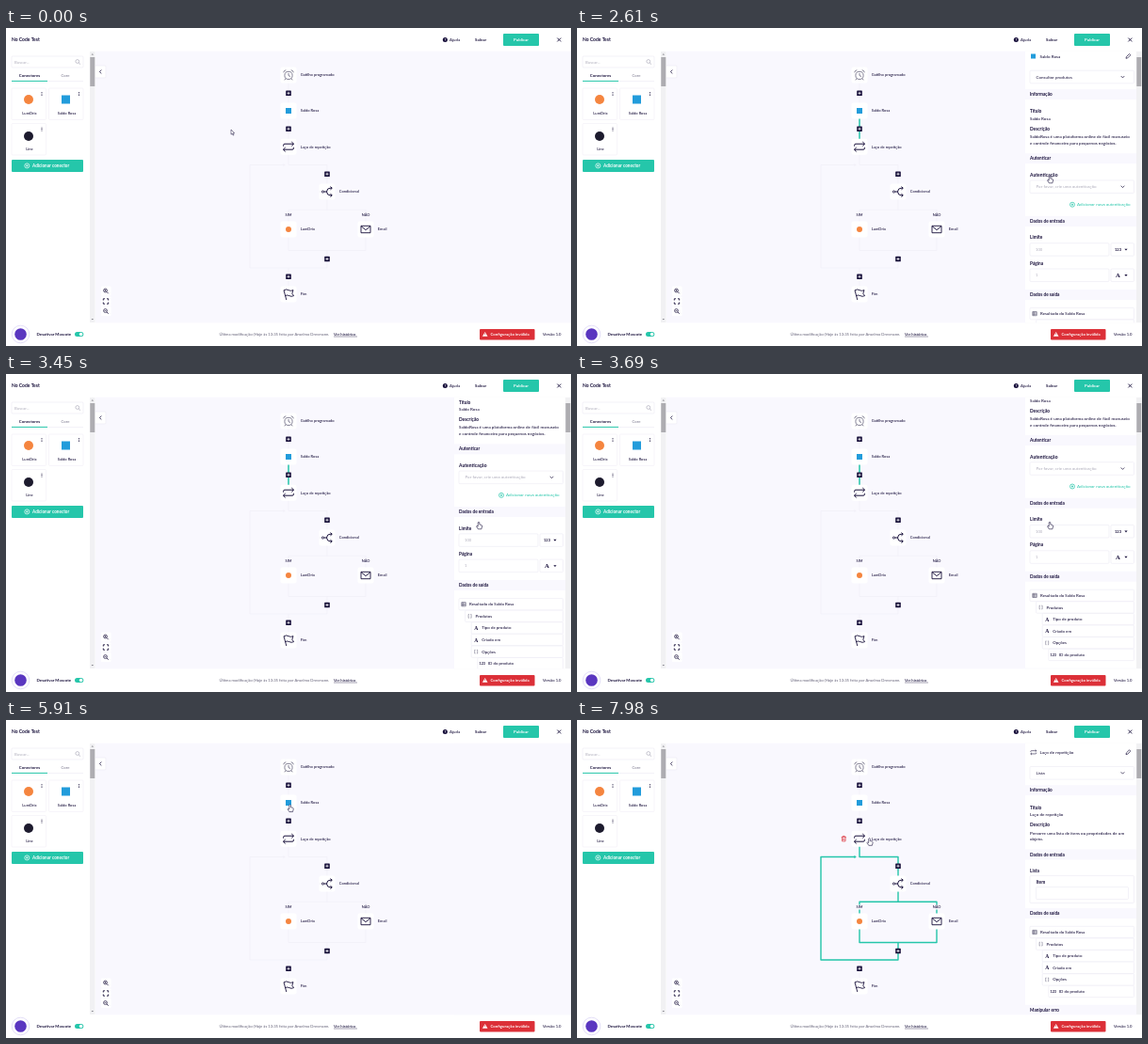
Write an HTML page with a canvas that moves like this. It is 600 px wide and 338 px high and loops after 8 s.

```html
<!DOCTYPE html>
<html lang="pt-BR">
<head>
<meta charset="utf-8">
<title>No Code Test</title>
<style>
html, body { margin: 0; width: 100%; height: 100%; overflow: hidden; background: #fff; }
canvas { display: block; width: 100vw; height: 100vh; }
</style>
</head>
<body>
<canvas id="stage"></canvas>
<script>
const W = 600, H = 338, LOOP = 8000;
const INK = '#170f3a', TEAL = '#25c6aa', RED = '#dc3038', BLUE = '#229cdb', ORANGE = '#f5853f';
const SOFT = '#f9f8fe', EDGE = '#ebe9f3', GREY = '#aeacbb', WHITE = '#fff';
const BRAND = 'Saldo Rosa';

const stage = document.getElementById('stage');
const ratio = Math.max(1, window.devicePixelRatio || 1);
stage.width = W * ratio;
stage.height = H * ratio;
const c = stage.getContext('2d');

// ---- drawing helpers ----
function text(str, x, y, size = 4.55, weight = 500, color = INK, align = 'left') {
  c.save();
  c.translate(x, y + size * 0.35);
  c.scale(0.1, 0.1);
  c.font = `${weight} ${size * 10}px Lato, "Open Sans", sans-serif`;
  c.textAlign = align;
  c.fillStyle = color;
  c.fillText(str, 0, 0);
  c.restore();
}
const bold = (str, x, y, size = 4.8, color = INK, align) => text(str, x, y, size, 700, color, align);

function rect(x, y, w, h, color) {
  c.fillStyle = color;
  c.fillRect(x, y, w, h);
}
function box(x, y, w, h, fill = WHITE, stroke = EDGE, r = 1) {
  c.beginPath();
  c.roundRect(x, y, w, h, r);
  if (fill) { c.fillStyle = fill; c.fill(); }
  if (stroke) { c.strokeStyle = stroke; c.lineWidth = 0.6; c.stroke(); }
}
function dot(x, y, r, color) {
  c.beginPath();
  c.arc(x, y, r, 0, 7);
  c.fillStyle = color;
  c.fill();
}
function ring(x, y, r, color = INK, width = 0.7) {
  c.beginPath();
  c.arc(x, y, r, 0, 7);
  c.strokeStyle = color;
  c.lineWidth = width;
  c.stroke();
}
function line(color, width, ...pts) {
  c.beginPath();
  for (let i = 0; i < pts.length; i += 2) c.lineTo(pts[i], pts[i + 1]);
  c.strokeStyle = color;
  c.lineWidth = width;
  c.stroke();
}
function path(d, x, y, stroke = INK, width = 0.9, fill) {
  c.save();
  c.translate(x, y);
  const p = new Path2D(d);
  if (fill) { c.fillStyle = fill; c.fill(p); }
  if (stroke) { c.strokeStyle = stroke; c.lineWidth = width; c.stroke(p); }
  c.restore();
}

// ---- icons, each centred on x, y ----
const chevron = (x, y) => path('M-1.8 -1L0 0.9L1.8 -1', x, y, INK, 0.7);
const caret = (x, y) => path('M-1.6 -0.8H1.6L0 1.1Z', x, y, null, 0, INK);
const repeatIcon = (x, y, k = 1) => {
  c.save();
  c.translate(x, y);
  c.scale(k, k);
  path('M-5.5 -0.6V-1.5Q-5.5 -3 -4 -3H5.4M3.3 -5.2L5.6 -3L3.3 -0.8M5.5 0.6V1.5Q5.5 3 4 3H-5.4M-3.3 0.8L-5.6 3L-3.3 5.2', 0, 0, INK, 1);
  c.restore();
};
function clockIcon(x, y) {
  const grey = '#77748b';
  ring(x, y + 0.4, 4.1, grey, 0.9);
  path('M0 -2V0.6L2 1.5M-5.3 -2.7Q-5 -5 -2.7 -5.2M5.3 -2.7Q5 -5 2.7 -5.2M-3 3.6L-4.2 5.3M3 3.6L4.2 5.3', x, y, grey, 0.9);
}
function branchIcon(x, y) {
  path('M-3.4 0H-0.5M5 -3.8H3Q0 -3.8 -0.5 0Q0 3.8 3 3.8H5M3.5 -5.4L5.3 -3.8L3.5 -2.2M3.5 2.2L5.3 3.8L3.5 5.4', x, y, INK, 1);
  ring(x - 4.5, y, 1.1, INK, 0.8);
}
const mailIcon = (x, y) => path('M-5 -3.7H5V3.7H-5ZM-5 -3.4L0 0.7L5 -3.4', x, y, INK, 0.9);
const flagIcon = (x, y) => path('M-2.2 6L-5 -4.2Q-2 -6 0.2 -4.3Q2.5 -3 5 -4.4L3.8 -0.8L5.6 1.6Q3 3 0.8 1.6Q-1.3 0.4 -3.5 1.6', x, y, INK, 0.9);
const trashIcon = (x, y) => path('M-2.5 -1.8H2.5M-1 -1.8V-2.8H1V-1.8M-1.9 -1.8L-1.7 2.7H1.7L1.9 -1.8M-0.6 -0.5V1.6M0.6 -0.5V1.6', x, y, RED, 0.7);
const pencilIcon = (x, y) => path('M-2.3 2.3L-1.9 0.6L1.2 -2.5L2.5 -1.2L-0.6 1.9Z', x, y, INK, 0.7);
function lens(x, y, sign, color = INK) {
  ring(x - 0.5, y - 0.5, 1.9, color, 0.7);
  line(color, 0.8, x + 0.9, y + 0.9, x + 2.7, y + 2.7);
  if (sign) line(color, 0.6, x - 1.4, y - 0.5, x + 0.4, y - 0.5);
  if (sign === '+') line(color, 0.6, x - 0.5, y - 1.4, x - 0.5, y + 0.4);
}
function plusBox(x, y) {
  box(x - 2.8, y - 2.8, 5.6, 5.6, INK, null, 0.6);
  path('M-1.5 0H1.5M0 -1.5V1.5', x, y, WHITE, 0.8);
}
function plusRing(x, y, color) {
  ring(x, y, 2.5, color, 0.7);
  path('M-1.2 0H1.2M0 -1.2V1.2', x, y, color, 0.7);
}
const square = (x, y, s, color) => rect(x - s / 2, y - s / 2, s, s, color);

// ---- fixed frame of the page ----
function drawHeader() {
  rect(0, 0, W, 24.5, WHITE);
  bold('No Code Test', 6, 12.5, 5);
  dot(466.3, 12.5, 2.5, INK);
  bold('?', 466.3, 12.5, 4, WHITE, 'center');
  text('Ajuda', 471, 12.5, 4.4);
  bold('Salvar', 498, 12.5, 4.5);
  box(528, 6, 38, 13, TEAL, null);
  bold('Publicar', 547, 12.5, 4.4, WHITE, 'center');
  path('M-1.9 -1.9L1.9 1.9M1.9 -1.9L-1.9 1.9', 587.3, 12.5, INK, 0.9);
}

function card(x, y, label) {
  box(x, y, 36.5, 33.5, WHITE, '#f1eff7');
  for (const d of [-1.6, 0, 1.6]) dot(x + 32, y + 6 + d, 0.5, INK);
  text(label, x + 19, y + 27, 4.1, 500, INK, 'center');
}
function scrollbar(x) {
  rect(x, 25, 5.5, 288, '#f1f1f3');
  rect(x + 0.3, 31, 5, 31, '#adacb1');
}
function drawSidebar() {
  rect(0, 24.5, 95, 289, WHITE);
  box(6, 30, 76, 12);
  text('Buscar...', 9, 36.3, 4.3, 400, GREY);
  lens(76.3, 36, '', GREY);
  bold('Conectores', 25, 50.3, 4.4, INK, 'center');
  text('Core', 63, 50.3, 4.3, 400, '#77748b', 'center');
  line(EDGE, 0.6, 6, 56.5, 82, 56.5);
  line(TEAL, 1, 6, 56.4, 44, 56.4);
  card(6, 64, 'LumDrix');
  dot(24, 76, 5, ORANGE);
  card(45.5, 64, BRAND);
  square(63.5, 76, 9, BLUE);
  card(6, 101.5, 'Line');
  dot(24, 115, 5, '#1d1b2e');
  box(6, 140, 76, 13, TEAL, null);
  plusRing(22.3, 146.4, WHITE);
  bold('Adicionar conector', 28, 146.5, 4.65, WHITE);
  scrollbar(89);
  path('M-1.2 0.6L0 -0.7L1.2 0.6Z', 91.8, 28, null, 0, '#77777f');
  path('M-1.2 -0.6L0 0.7L1.2 -0.6Z', 91.8, 309.5, null, 0, '#77777f');
}

function drawFooter() {
  rect(0, 313.5, W, 24.5, WHITE);
  ring(15.5, 325.5, 9.3, '#dcd6f5', 0.8);
  dot(15.5, 325.5, 6.3, '#5a36c0');
  bold('Desativar Mascote', 32.5, 325.3, 4.4);
  box(73, 323, 9.3, 5, TEAL, null, 2.5);
  dot(79.6, 325.5, 1.8, WHITE);
  text('Última modificação (Hoje às 13:35 feita por Anselmo Drevmann.', 226.5, 325.3, 4.15, 400, '#605d74');
  text('Ver histórico', 348, 325.3, 4.2);
  line(INK, 0.4, 348, 328, 373, 328);
  box(503, 320, 58.5, 11.5, RED, null);
  path('M0 -2.5L2.8 2.3H-2.8Z', 508.7, 325.4, null, 0, WHITE);
  line(RED, 0.6, 508.7, 324.2, 508.7, 326.2);
  bold('Configuração inválida', 514.5, 325.4, 4.3, WHITE);
  text('Versão 1.0', 570, 325.3, 4.2);
}

// ---- flow diagram ----
function node(x, y, label, icon) {
  box(x - 8.5, y - 8.5, 17, 17, WHITE, null, 2);
  icon(x, y);
  text(label, x + 12.7, y, 4.1);
}
function loopLines(color, w) {
  line(color, w, 300, 134, 300, 145.5, 341, 145.5, 341, 166);
  line(color, w, 341, 182, 341, 193.2);
  line(color, w, 300, 206, 300, 193.2, 382, 193.2, 382, 206);
  line(color, w, 300, 222, 300, 236.5, 382, 236.5, 382, 222);
  line(color, w, 341, 236.5, 341, 255, 259, 255, 259, 145.5, 296, 145.5);
  path('M-1.6 -1.6L0.8 0L-1.6 1.6Z', 296, 145.5, null, 0, color);
}
function drawFlow(s) {
  rect(95, 24.5, 505, 289, SOFT);
  box(94.5, 40, 11.5, 13, WHITE, EDGE);
  path('M1 -1.9L-0.9 0L1 1.9', 100.3, 46.5, INK, 0.8);

  const pale = '#f1eff8';
  line(pale, 0.7, 300, 58, 300, 80);
  line(pale, 0.7, 300, 96, 300, 118);
  line(pale, 0.7, 300, 255, 300, 275);
  loopLines(pale, 0.7);
  if (s.linkOn) line(TEAL, 1.5, 300, 96, 300, 118);
  if (s.loopOn) loopLines(TEAL, 1.4);

  for (const [x, y] of [[300, 69.3], [300, 107.2], [341, 155.2], [341, 245.5], [300, 264.3]]) plusBox(x, y);
  for (const [label, x] of [['SIM', 300], ['NÃO', 382]]) {
    rect(x - 5, 196.5, 10, 5, SOFT);
    text(label, x, 199, 3.9, 500, INK, 'center');
  }
  node(300, 50, 'Gatilho programado', clockIcon);
  node(300, 88, BRAND, (x, y) => square(x, y, 6, BLUE));
  node(300, 126.2, 'Laço de repetição', repeatIcon);
  node(341, 174, 'Condicional', branchIcon);
  node(300, 214, 'LumDrix', (x, y) => dot(x, y, 3, ORANGE));
  node(382, 214, 'Email', mailIcon);
  node(300, 283, 'Fim', flagIcon);
  if (s.trashOn) trashIcon(283.3, 126.2);

  for (const y of [279.5, 290.5, 301]) box(101, y - 5, 10.5, 10, WHITE, null);
  lens(106, 279.5, '+');
  path('M-2.7 -1V-2.7H-1M1 -2.7H2.7V-1M2.7 1V2.7H1M-1 2.7H-2.7V1', 106, 290.5, INK, 0.9);
  lens(106, 301, '-');
}

// ---- side panel ----
function bar(label, y) {
  rect(476, y - 5.5, 118, 11, SOFT);
  bold(label, 481, y, 4.7);
}
function select(label, y, color = INK) {
  box(481, y - 6.8, 110.5, 13.6);
  text(label, 487.5, y, 4.55, 400, color);
  chevron(579.5, y);
}
function input(label, hint, y, kind) {
  bold(label, 481, y);
  box(481, y + 6, 84, 13.5);
  text(hint, 487, y + 12.7, 4.2, 400, GREY);
  box(567, y + 6, 24.5, 13.5);
  typeMark(kind, 574.5, y + 12.7, 1.2);
  caret(583, y + 12.8);
}
function typeMark(kind, x, y, k = 1) {
  if (kind === 'A') {
    c.fillStyle = INK;
    c.font = `700 ${5.6 * k}px "Liberation Serif", serif`;
    c.textAlign = 'center';
    c.fillText('A', x, y + 2 * k);
  } else if (kind === '123') bold('123', x, y, 3.7 * k ** 0.5, INK, 'center');
  else if (kind === '[]') path('M-0.7 -1.9H-1.5V1.9H-0.7M0.7 -1.9H1.5V1.9H0.7', x, y, '#77748b', 0.6);
  else path('M-2.2 -2.1H2.2V2.1H-2.2ZM-2.2 -0.7H2.2M-2.2 0.7H2.2M-0.8 -2.1V2.1', x, y, '#55516c', 0.6);
}
function tree(y) {
  const rows = [
    ['table', 'Resultado do ' + BRAND, 0], ['[]', 'Produtos', 1], ['A', 'Tipo de produto', 2],
    ['A', 'Criado em', 2], ['[]', 'Opções', 2], ['123', 'ID do produto', 3]
  ];
  rows.forEach(([kind, label, depth], i) => {
    const x = 481 + depth * 6.6, ry = y + i * 12.6;
    box(x, ry - 6.2, 591.5 - x, 12.4);
    typeMark(kind, x + 5, ry);
    text(label, x + 11, ry, 4.4);
  });
}
function intro(title, action, lines) {
  text(title, 491.5, 34.3, 4.6);
  pencilIcon(585.3, 34.3);
  select(action, 56.3);
  bar('Informação', 74.7);
  bold('Título', 481, 93);
  text(title, 481, 100.5);
  bold('Descrição', 481, 111.5);
  lines.forEach((l, i) => text(l, 481, 120 + i * 6.8));
}
function connectorPanel() {
  square(484.5, 34.3, 5, BLUE);
  intro(BRAND, 'Consultar produtos',
    ['SaldoRosa é uma plataforma online de fácil manuseio', 'e controle financeiro para pequenos negócios.']);
  bar('Autenticar', 143);
  bold('Autenticação', 481, 160.7, 5);
  select('Por favor, crie uma autenticação', 173, GREY);
  plusRing(526, 192, TEAL);
  text('Adicionar nova autenticação', 531, 192, 4.55, 400, TEAL);
  bar('Dados de entrada', 209.7);
  input('Limite', '100', 227, '123');
  input('Página', '1', 254.3, 'A');
  bar('Dados de saída', 287.7);
  tree(307.9);
  bar('Manipular erro', 390.7);
}
function loopPanel() {
  repeatIcon(484.8, 34.3, 0.55);
  intro('Laço de repetição', 'Lista',
    ['Percorre uma lista de itens ou propriedades de um', 'objeto.']);
  bar('Dados de entrada', 143);
  bold('Lista', 481, 160.7);
  box(481, 165.5, 110.5, 29);
  bold('Item', 487.5, 172);
  box(487.5, 177.5, 98, 13);
  bar('Dados de saída', 205.5);
  tree(225.5);
  bar('Manipular erro', 308.3);
}
function drawPanel(content, open, scroll) {
  if (open <= 0) return;
  c.save();
  c.beginPath();
  c.rect(476, 24.5, 124, 289);
  c.clip();
  c.translate((1 - open) * 124, 0);
  rect(476, 24.5, 124, 289, WHITE);
  c.save();
  c.translate(0, -scroll);
  content();
  c.restore();
  scrollbar(594);
  c.restore();
}

// ---- pointer ----
function drawPointer({ x, y }, hand) {
  if (hand) {
    path('M-0.8 0.8Q0 -0.7 0.8 0.8V3L3 3.5Q3.8 3.8 3.6 5L2.9 7.8H-0.7L-2.5 5Q-2.4 3.8 -0.8 5Z', x, y, INK, 0.6, WHITE);
  } else {
    path('M0 0V5.2L1.2 4.1L2.1 6.1L3 5.7L2.1 3.8H3.7Z', x, y, INK, 0.5, WHITE);
  }
}

// ---- motion ----
const clamp = v => Math.min(1, Math.max(0, v));
const part = (t, a, b) => clamp((t - a) / (b - a));
const inOut = p => p * p * (3 - 2 * p);
const cubic = p => p < 0.5 ? 4 * p ** 3 : 1 - (2 - 2 * p) ** 3 / 2;
const out = p => 1 - (1 - p) ** 3;

// start, end, x, y
const MOVES = [
  [0, 690, 301, 87], [1430, 2340, 502, 157], [4080, 4800, 301.5, 87],
  [5820, 6360, 303, 124], [7620, 7980, 310.5, 125.5]
];
function pointerAt(t) {
  let x = 239, y = 108;
  for (const [a, b, nx, ny] of MOVES) {
    const k = inOut(part(t, a, b));
    x += (nx - x) * k;
    y += (ny - y) * k;
  }
  return { x, y };
}

function render(t) {
  c.setTransform(stage.width / W, 0, 0, stage.height / H, 0, 0);
  c.lineJoin = 'round';
  const first = out(part(t, 1230, 1400)) * (1 - inOut(part(t, 5250, 5580)));
  const second = out(part(t, 7410, 7710));
  const scroll = 31 * cubic(part(t, 2510, 2820)) + 31.5 * cubic(part(t, 2960, 3210))
    + 10 * cubic(part(t, 3370, 3690));
  drawFlow({
    linkOn: t >= 1260 && t < 5280,
    loopOn: t >= 7440,
    trashOn: t >= 6120
  });
  drawPanel(connectorPanel, first, scroll);
  drawPanel(loopPanel, second, 0);
  drawSidebar();
  drawHeader();
  drawFooter();
  drawPointer(pointerAt(t), t > 540);
}

const start = performance.now();
function tick() {
  render((performance.now() - start) % LOOP);
  requestAnimationFrame(tick);
}
tick();
</script>
</body>
</html>
```
